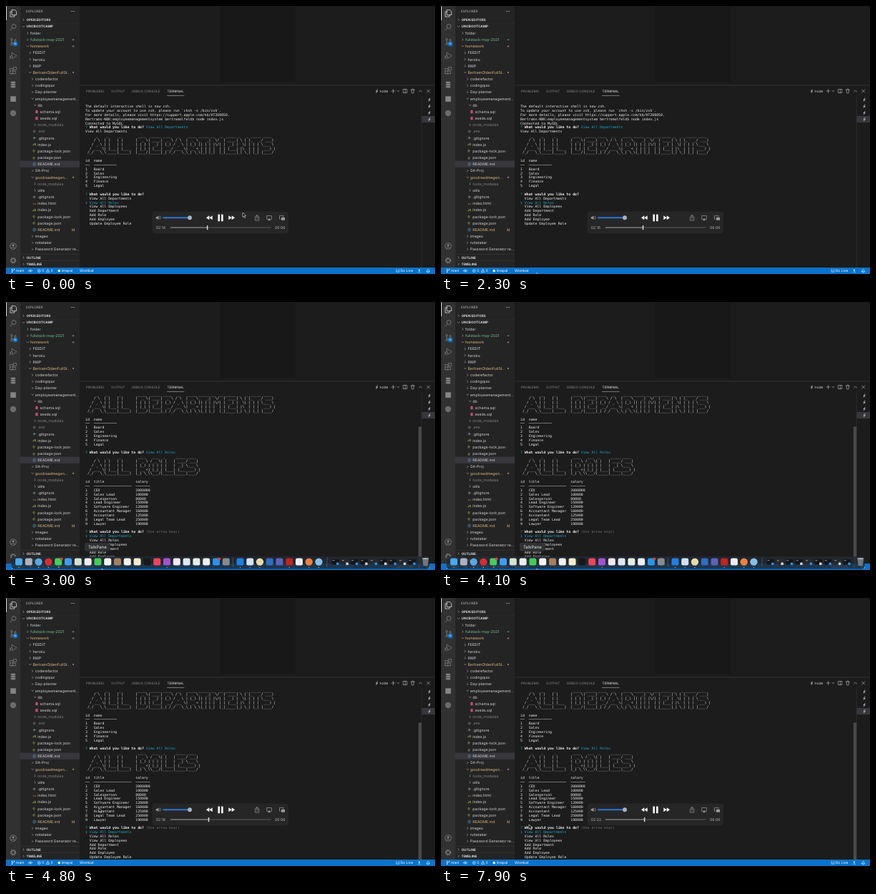
An HTML page that plays this animation: 600 by 375 pixels, repeating every 8000 ms.

```html
<!DOCTYPE html>
<html lang="en">
<head>
<meta charset="utf-8">
<title>Terminal session recording</title>
<style>
html, body { margin: 0; width: 100%; height: 100%; overflow: hidden; background: #1c1c1c; }
svg { display: block; width: 100vw; height: 100vh; }
text { font-family: Inter, "Open Sans", sans-serif; text-rendering: geometricPrecision; white-space: pre; }
.mono { font-family: "DejaVu Sans Mono", "Liberation Mono", monospace; }
</style>
</head>
<body>
<svg id="stage" viewBox="0 0 600 375" preserveAspectRatio="none"></svg>
<script>
const LOOP = 8000;
const svg = document.getElementById('stage');

function el(parent, tag, attrs, content) {
  const node = document.createElementNS('http://www.w3.org/2000/svg', tag);
  for (const key in attrs) node.setAttribute(key, attrs[key]);
  if (content !== undefined) node.textContent = content;
  parent.appendChild(node);
  return node;
}
const group = (parent = svg) => el(parent, 'g', {});
const rect = (p, x, y, width, height, fill, rx = 0) => el(p, 'rect', { x, y, width, height, fill, rx });
const dot = (p, cx, cy, r, fill) => el(p, 'circle', { cx, cy, r, fill });
const line = (p, d, stroke, width = 0.7) =>
  el(p, 'path', { d, stroke, fill: 'none', 'stroke-width': width, 'stroke-linecap': 'round', 'stroke-linejoin': 'round' });
// y is the vertical centre of the line of text
const label = (p, x, y, str, fill, size = 5.25, weight = 400) =>
  el(p, 'text', { x, y: y + size * 0.36, fill, 'font-size': size, 'font-weight': weight }, str);

// ---- window areas ----
const GREY = '#858585', TEXT = '#d4d4d4', AMBER = '#e0b97a', GREEN = '#6fc28c';
rect(svg, 0, 0, 600, 375, '#1c1c1c');
rect(svg, 299, 1, 106, 106, '#181818');
rect(svg, 0, 0, 20, 366, '#313131');
rect(svg, 20, 0, 83, 366, '#242425');

// ---- activity bar ----
function activityBar() {
  const g = group();
  rect(g, 0, 0, 0.8, 20, '#fff');
  line(g, 'M8.5 5.5h4l2 2v5h-6zM8.5 8h-2.6v7h6v-2.5', '#f0f0f0');
  line(g, 'M8.6 30.8L6 34', GREY);
  el(g, 'circle', { cx: 11, cy: 28.5, r: 3, fill: 'none', stroke: GREY, 'stroke-width': 0.8 });
  for (const [x, y] of [[8, 46.5], [8, 53.5], [13, 48]])
    el(g, 'circle', { cx: x, cy: y, r: 1.3, fill: 'none', stroke: GREY, 'stroke-width': 0.7 });
  line(g, 'M8 47.8v4.4M13 49.3q0 2-5 2.2', GREY);
  dot(g, 13, 53, 3.2, '#0a78d0');
  label(g, 11.3, 53, '17', '#fff', 3, 600);
  line(g, 'M8 70v-5l7 4.7-5 3.5M6 71.5a1.8 1.8 0 1 0 3.6 0a1.8 1.8 0 1 0-3.6 0M5 70l1 1M5 74l1-1', GREY);
  line(g, 'M6 87.5h3.7v7.2H6zM6 91h7.4v3.7H6M10.8 85.5h3.7v3.7h-3.7z', GREY);
  for (const y of [107, 110, 113]) el(g, 'ellipse', { cx: 10, cy: y, rx: 3.7, ry: 1.7, fill: GREY, stroke: '#313131', 'stroke-width': 0.5 });
  rect(g, 6.2, 126.3, 7.6, 7.6, '#858585');
  dot(g, 10, 150, 4.2, '#6c6c6c');
  el(g, 'circle', { cx: 10, cy: 336, r: 4.3, fill: 'none', stroke: GREY, 'stroke-width': 0.8 });
  dot(g, 10, 334.8, 1.5, GREY);
  line(g, 'M7.3 338.9q2.7-3.3 5.4 0', GREY);
  el(g, 'circle', { cx: 10, cy: 356, r: 3.4, fill: 'none', stroke: GREY, 'stroke-width': 1.5, 'stroke-dasharray': '1.7 .97' });
  el(g, 'circle', { cx: 10, cy: 356, r: 2.4, fill: 'none', stroke: GREY, 'stroke-width': 0.8 });
}

// ---- explorer ----
function arrow(p, x, y, open) {
  line(p, open ? `M${x - 1.4} ${y - 0.7}l1.4 1.4 1.4-1.4` : `M${x - 0.7} ${y - 1.4}l1.4 1.4-1.4 1.4`, '#b4b4b4', 0.6);
}

function fileIcon(p, name, x, y) {
  const ext = name.split('.').pop();
  if (ext === 'sql') {
    rect(p, x - 1.7, y - 2.2, 3.4, 4.4, '#e0507d', 1.2);
    line(p, `M${x - 1.6} ${y}h3.2`, '#242425', 0.4);
  } else if (ext === 'md') {
    el(p, 'circle', { cx: x, cy: y, r: 2, fill: 'none', stroke: '#4793b8', 'stroke-width': 0.7 });
    line(p, `M${x} ${y - 0.2}v1M${x} ${y - 1}v.05`, '#4793b8', 0.6);
  } else if (ext === 'env') {
    el(p, 'circle', { cx: x, cy: y, r: 1.4, fill: 'none', stroke: '#6b7b83', 'stroke-width': 1 });
  } else if (ext === 'gitignore') {
    el(p, 'path', { d: `M${x} ${y - 2.2}l2.2 2.2-2.2 2.2-2.2-2.2z`, fill: '#56686f' });
  } else {
    const [mark, color] = { js: ['JS', '#cbcb41'], json: ['{}', '#cbcb41'], html: ['<>', '#e37933'] }[ext];
    label(p, x - 2.3, y, mark, color, 3.9, 600);
  }
}

// depth, kind (+ closed, - open, f file), state (u new, m modified, i ignored), name
const TREE = `0+ folder
0+u fullstack-may-2021
0-m homework
1+ FEEDIT
1+ heroku
1+ RWP
1-m BertramOldenFullSt...
2+ coderefactor
2+ codingquiz
2+ Day-planner
2- employeemanagement...
3- db
4f schema.sql
4f seeds.sql
3+i node_modules
3fi .env
3f .gitignore
3f index.js
3f package-lock.json
3f package.json
3f README.md
2+ Git-Proj
2-m goodreadmegen...
3+i node_modules
3+ utils
3f .gitignore
3f index.html
3f index.js
3f package-lock.json
3f package.json
3fm README.md
2+ images
2+ notetaker
2+ Password Generator re...`.split('\n');

function explorer() {
  const g = group();
  label(g, 28, 7.5, 'EXPLORER', '#b8b8b8', 4.6);
  for (let i = 0; i < 3; i++) dot(g, 91.5 + i * 2, 7.5, 0.55, TEXT);
  const section = (y, name, open) => {
    arrow(g, 24.5, y, open);
    label(g, 28.5, y, name, '#d8d8d8', 4.65, 700);
  };
  section(19.2, 'OPEN EDITORS', false);
  line(g, 'M20 24.3h83', '#343435', 0.4);
  section(28.8, 'UNCBOOTCAMP', true);
  rect(g, 20, 216.6, 83, 9.2, '#37373d');
  TREE.forEach((row, i) => {
    const [, depth, kind, state, name] = row.match(/^(\d)(.)(\w?) (.*)$/);
    const x = 34 + depth * 3.4, y = 38 + i * 9.167;
    const color = { u: GREEN, m: AMBER, i: '#858585' }[state] || TEXT;
    if (kind === 'f') fileIcon(g, name, x - 4.6, y);
    else arrow(g, x - 3.6, y, kind === '-');
    label(g, x, y, name, color);
    if (state === 'm' && kind === 'f') label(g, 92, y, 'M', AMBER, 4.8);
    else if (state === 'u' || state === 'm') el(g, 'circle', { cx: 94, cy: y, r: 1.2, fill: color, opacity: 0.55 });
  });
  line(g, 'M20 347.3h83M20 356.6h83', '#3c3c3d', 0.5);
  section(352, 'OUTLINE', false);
  section(361.3, 'TIMELINE', false);
}

// ---- terminal panel ----
function panel() {
  const g = group();
  line(g, 'M103 111h497', '#3f3f3f', 0.6);
  [[112, 'PROBLEMS'], [147, 'OUTPUT'], [176, 'DEBUG CONSOLE'], [225.5, 'TERMINAL']].forEach(([x, name], i) =>
    label(g, x, 119, name, i === 3 ? '#e7e7e7' : '#8c8c8c', 4.6));
  line(g, 'M225.5 125.4h23.5', '#d8d8d8', 0.5);
  const spark = (x, y) => line(g, `M${x + 1} ${y - 2}l-2 2.2h2.2l-2 2`, '#d0d0d0', 0.9);
  spark(518.5, 119);
  label(g, 522.5, 119, 'node', TEXT, 5);
  line(g, 'M539 119h5M541.5 116.5v5M547 118.3l1.5 1.5 1.5-1.5M555.8 116.5h5v5h-5zM558.3 116.5v5', '#c0c0c0', 0.6);
  line(g, 'M566.3 117.2h5M567 117.2l.4 4.6h2.8l.4-4.6M568 116.2h1.6M577.7 120l2-2 2 2M588.7 117l4 4M592.7 117l-4 4', '#c0c0c0', 0.6);
  rect(g, 581.5, 153.9, 18.5, 9.2, '#37373d');
  line(g, 'M581.3 126v240', '#3c3c3c', 0.5);
  for (let i = 0; i < 4; i++) spark(592, 131 + i * 9.167);
}

const COL = 2.926, ROW = 5.84, CYAN = '#17a8ca', WHITE = '#ececec';

function write(p, row, col, str, fill = WHITE, weight = 400) {
  const size = 4.86;
  el(p, 'text', { class: 'mono', x: 111 + col * COL, y: 140.5 + row * ROW + 1.7, fill, 'font-size': size, 'font-weight': weight },
    str.replace(/ /g, '\u00a0'));
}
const writeAll = (p, row, lines) => lines.forEach((s, i) => write(p, row + i, 0, s));
const rule = n => '─'.repeat(n);

function prompt(p, row, note, color) {
  write(p, row, 0, '?', '#23b07a');
  write(p, row, 2, 'What would you like to do?', '#f6f6f6', 700);
  if (note) write(p, row, 29, note, color);
}

const MENU = ['View All Departments', 'View All Roles', 'View All Employees', 'Add Department', 'Add Role', 'Add Employee', 'Update Employee Role'];
function menu(p, row, picked) {
  MENU.forEach((name, i) => write(p, row + i, 2, name, i === picked ? CYAN : WHITE));
  write(p, row + picked, 0, '❯', CYAN);
}

const ALL = String.raw`
     _    _     _       
    / \  | |   | |      
   / _ \ | |   | |      
  / ___ \| |___| |___   
 /_/   \_\_____|_____|  `.split('\n').slice(1).map(s => s.padEnd(24));
const DEPARTMENTS = String.raw`
 ____  _____ ____   _    ____ _____ __  __ _____ _   _ _____ ____
|  _ \| ____|  _ \ / \  |  _ \_   _|  \/  | ____| \ | |_   _/ ___|
| | | |  _| | |_) / _ \ | |_) || | | |\/| |  _| |  \| | | | \___ \
| |_| | |___|  __/ ___ \|  _ < | | | |  | | |___| |\  | | |  ___) |
|____/|_____|_| /_/   \_\_| \_\|_| |_|  |_|_____|_| \_| |_| |____/`.split('\n').slice(1);
const ROLES = String.raw`
 ____   ___  _     _____ ____
|  _ \ / _ \| |   | ____/ ___|
| |_) | | | | |   |  _| \___ \
|  _ <| |_| | |___| |___ ___) |
|_| \_\\___/|_____|_____|____/`.split('\n').slice(1);
const banner = (p, row, word) => writeAll(p, row, ALL.map((s, i) => s + word[i]));

function departments(p, row) {
  banner(p, row, DEPARTMENTS);
  const names = ['Board', 'Sales', 'Engineering', 'Finance', 'Legal'];
  writeAll(p, row + 6, ['id  name', `${rule(2)}  ${rule(11)}`, ...names.map((n, i) => `${i + 1}   ${n}`)]);
}

function firstScreen() {
  const g = group();
  writeAll(g, 0, [
    'The default interactive shell is now zsh.',
    'To update your account to use zsh, please run `chsh -s /bin/zsh`.',
    'For more details, please visit https://support.apple.com/kb/HT208050.',
    'Bertrams-NBK:employeemanagementsystem bertramolfeld$ node index.js',
    'Connected to MySQL'
  ]);
  prompt(g, 5, MENU[0], CYAN);
  write(g, 6, 0, MENU[0]);
  departments(g, 7);
  prompt(g, 21);
  menu(g, 22, 1);
  return g;
}

function secondScreen() {
  const g = group();
  departments(g, -2);
  prompt(g, 12, MENU[1], CYAN);
  banner(g, 13, ROLES);
  const roles = [['CEO', 2000000], ['Sales Lead', 100000], ['Salesperson', 80000], ['Lead Engineer', 150000],
    ['Software Engineer', 120000], ['Accountant Manager', 160000], ['Accountant', 125000],
    ['Legal Team Lead', 250000], ['Lawyer', 190000]];
  const tableRow = (a, b, c) => String(a).padEnd(4) + b.padEnd(20) + c;
  writeAll(g, 19, [tableRow('id', 'title', 'salary'), tableRow(rule(2), rule(18), rule(7)),
    ...roles.map(([name, pay], i) => tableRow(i + 1, name, pay))]);
  prompt(g, 31, '(Use arrow keys)', '#6e6e6e');
  menu(g, 32, 0);
  return g;
}

// ---- status bar ----
function statusBar() {
  const g = group(), ink = '#fff';
  rect(g, 0, 366, 600, 9, '#0b73cb');
  line(g, 'M8.5 368.7v3.6M11.5 368.7q0 2-3 2.2', ink, 0.6);
  for (const [x, y] of [[8.5, 368.5], [8.5, 372.4], [11.5, 368.5]]) dot(g, x, y, 0.7, ink);
  label(g, 14, 370.5, 'main', ink, 5);
  line(g, 'M31.5 370.5q2.7-3 5.4 0q-2.7 3-5.4 0z', ink, 0.6);
  dot(g, 34.2, 370.5, 0.8, ink);
  el(g, 'circle', { cx: 46.3, cy: 370.5, r: 2, fill: 'none', stroke: ink, 'stroke-width': 0.5 });
  line(g, 'M45.5 369.7l1.6 1.6M47.1 369.7l-1.6 1.6M56.5 372.3h4.4l-2.2-4zM58.7 370v.9', ink, 0.5);
  label(g, 50.2, 370.5, '0', ink, 5);
  label(g, 62.6, 370.5, '0', ink, 5);
  dot(g, 74.3, 370.5, 1.7, ink);
  label(g, 77.8, 370.5, 'linepal', ink, 5);
  label(g, 103, 370.5, 'Wombat', ink, 5);
  line(g, 'M546.5 368.5q-1.6 2 0 4M549.5 368.5q1.6 2 0 4M548 370.5v2', ink, 0.6);
  label(g, 551.5, 370.5, 'Go Live', ink, 5);
  dot(g, 578, 369.4, 1, ink);
  line(g, 'M576.3 372.5q1.7-2.6 3.4 0M588.3 371.8h4.4l-.8-1.1v-1.2q-1.4-2-2.8 0v1.2zM590 372.8h1', ink, 0.6);
}

// ---- player controls ----
const TRACK = { x: 230, width: 140, seconds: 366 };
function controls() {
  const g = group(), ink = '#9c9c9c';
  rect(g, 204.5, 287.5, 190.5, 30.5, '#262626', 4);
  el(g, 'path', { d: 'M209.8 295h1.6l2-1.6v5.6l-2-1.6h-1.6z', fill: ink });
  line(g, 'M214.6 294.7q1 1.5 0 3M215.8 293.7q1.9 2.5 0 5', ink, 0.5);
  line(g, 'M220 296.3h37', '#2878d8', 1.9);
  dot(g, 257, 296.3, 3, '#a9b4c4');
  const skip = (x, s) => el(g, 'path', { d: `M${x} 293.2v6l${4.4 * s}-3zM${x + 4.4 * s} 293.2v6l${4.4 * s}-3z`, fill: '#f4f4f4' });
  skip(288.7, -1);
  skip(311.3, 1);
  rect(g, 296.4, 291.6, 2.7, 9.6, '#f4f4f4', 0.5);
  rect(g, 301, 291.6, 2.7, 9.6, '#f4f4f4', 0.5);
  line(g, 'M349.8 295h-1.4v5h5.4v-5h-1.4M351.1 298v-5.5M349.7 293.8l1.4-1.4 1.4 1.4', ink, 0.7);
  line(g, 'M366 298.3h-1.2v-4.8h6.6v4.8h-1.2', ink, 0.7);
  el(g, 'path', { d: 'M368.1 297l2.3 2.9h-4.6z', fill: ink });
  line(g, 'M384 298h-1.5v-4.6h5.6v1.5', ink, 0.7);
  rect(g, 385, 295.8, 5, 4, ink, 0.5);
  const clock = label(g, 209.8, 310, '', '#b4b4b4', 5.2);
  label(g, 376, 310, '06:06', '#b4b4b4', 5.2);
  line(g, `M${TRACK.x} 310h${TRACK.width}`, '#484848', 1.3);
  const played = rect(g, TRACK.x, 309.4, 1, 1.3, '#7c7c7c');
  const knob = rect(g, 0, 307, 1.5, 6.2, '#dedede', 0.6);
  return { g, clock, played, knob };
}

// ---- dock ----
const LEFT_APPS = '#4aa8ee #b0b2ba #5ba6e6 #dc2a33 #45cf58 #3f9df2 #d5e2d2 #f0eeee #43cc55 #f3f3f3 #a5805c #f0f0ee #f4ecc8 #16181a #f04358 #a351d3 #f2e9ec #dfe8f0 #e6efe6 #eef0f2 #2694f0 #878b91'.split(' ');
const RIGHT_APPS = '#1f7fe6 #cfe3f2 #e8d9a8 #2f6cc4 #5c63b8 #c3231e #efecef #f0803a #86bfe8'.split(' ');
const leftX = i => 18 + i * 13.8, rightX = i => 327.5 + i * 13.75;

function dock() {
  const g = group();
  rect(g, 7.5, 356, 585, 17.6, 'rgba(34,42,52,.84)', 4);
  const icon = (x, color, round) => round ? dot(g, x, 363.6, 5.2, color) : rect(g, x - 5, 358.6, 10, 10, color, 2.3);
  LEFT_APPS.forEach((c, i) => icon(leftX(i), c, i === 2 || i === 3));
  RIGHT_APPS.forEach((c, i) => icon(rightX(i), c, i === 2 || i > 6));
  for (const i of [4, 20]) dot(g, leftX(i) + 4.4, 359.4, 2, '#ee3b36');
  line(g, 'M317.5 358v12M449 358v12', '#6d7782', 0.5);
  // minimised windows
  for (let i = 0; i < 9; i++) {
    const x = 455.5 + i * 13.4;
    rect(g, x, 360, 10.2, 7.2, i % 3 === 1 ? '#25292f' : '#131518', 0.6);
    rect(g, x + 1, 361.2, 3, 1, '#8d949c');
    rect(g, x + 6.6, 364.6, 3.4, 3.4, i % 2 ? '#dedede' : '#3a8fe0', 0.8);
  }
  el(g, 'path', { d: 'M582.3 358.6h8.8l-1.3 10.6h-6.2z', fill: '#70777e' });
  el(g, 'ellipse', { cx: 586.7, cy: 359, rx: 4.4, ry: 1, fill: '#a6adb4' });
  const running = [0, 2, 3, 4, 15].map(leftX).concat([0, 1, 2, 5, 7, 8].map(rightX));
  for (const x of running) dot(g, x, 371.5, 0.6, '#d8dde2');
  return g;
}

function tooltip() {
  const g = group();
  rect(g, 110, 337, 35.5, 11.5, '#303133', 2);
  el(g, 'path', { d: 'M125.5 348.5h5l-2.5 2.6z', fill: '#303133' });
  const t = label(g, 127.8, 342.8, 'TalkPane', '#ececec', 6);
  t.setAttribute('text-anchor', 'middle');
  return g;
}

activityBar();
explorer();
panel();
const first = firstScreen();
const second = secondScreen();
rect(second, 576.8, 174.5, 4.3, 191.5, '#494949');
statusBar();
const player = controls();
const dockBar = dock();
const tip = tooltip();
const cursor = el(svg, 'path', { d: 'M0 0v6.3l1.5-1.3 1 2.3 1.1-.5-1-2.2h2z', fill: '#0a0a0a', stroke: '#f0f0f0', 'stroke-width': 0.6 });

// ---- motion ----
function ramp(t, from, to) {
  const k = Math.min(1, Math.max(0, (t - from) / (to - from)));
  return k * k * (3 - 2 * k);
}
const show = (node, on) => node.setAttribute('visibility', on ? 'visible' : 'hidden');

// time, x, y
const PATH = [[0, 331, 289], [900, 331, 289], [2000, 134, 373], [4450, 134, 373], [4750, 130, 293.5], [5000, 130, 293.5], [5500, 123, 317], [LOOP, 123, 317]];
function cursorAt(t) {
  const i = PATH.findIndex((p, n) => n > 0 && t <= p[0]);
  const [t0, x0, y0] = PATH[i - 1], [t1, x1, y1] = PATH[i];
  const k = ramp(t, t0, t1);
  return [x0 + (x1 - x0) * k, y0 + (y1 - y0) * k];
}

function update(t) {
  const scrolled = t >= 2800;
  show(first, !scrolled);
  show(second, scrolled);

  const seconds = 134.15 + t / 1000;
  const whole = Math.floor(seconds);
  player.clock.textContent = `0${Math.floor(whole / 60)}:${String(whole % 60).padStart(2, '0')}`;
  const x = TRACK.width * seconds / TRACK.seconds;
  player.played.setAttribute('width', x);
  player.knob.setAttribute('x', TRACK.x + x - 0.4);
  player.g.setAttribute('opacity', 1 - ramp(t, 2650, 2850) + ramp(t, 4600, 4750));

  const raised = ramp(t, 2750, 2950) - ramp(t, 4500, 4750);
  dockBar.setAttribute('transform', `translate(0 ${20 * (1 - raised)})`);
  show(dockBar, raised > 0);
  show(tip, t >= 2950 && t < 4500);
  cursor.setAttribute('transform', `translate(${cursorAt(t).join(' ')})`);
}

const start = performance.now();
function frame() {
  update((performance.now() - start) % LOOP);
  requestAnimationFrame(frame);
}
frame();
</script>
</body>
</html>
```
